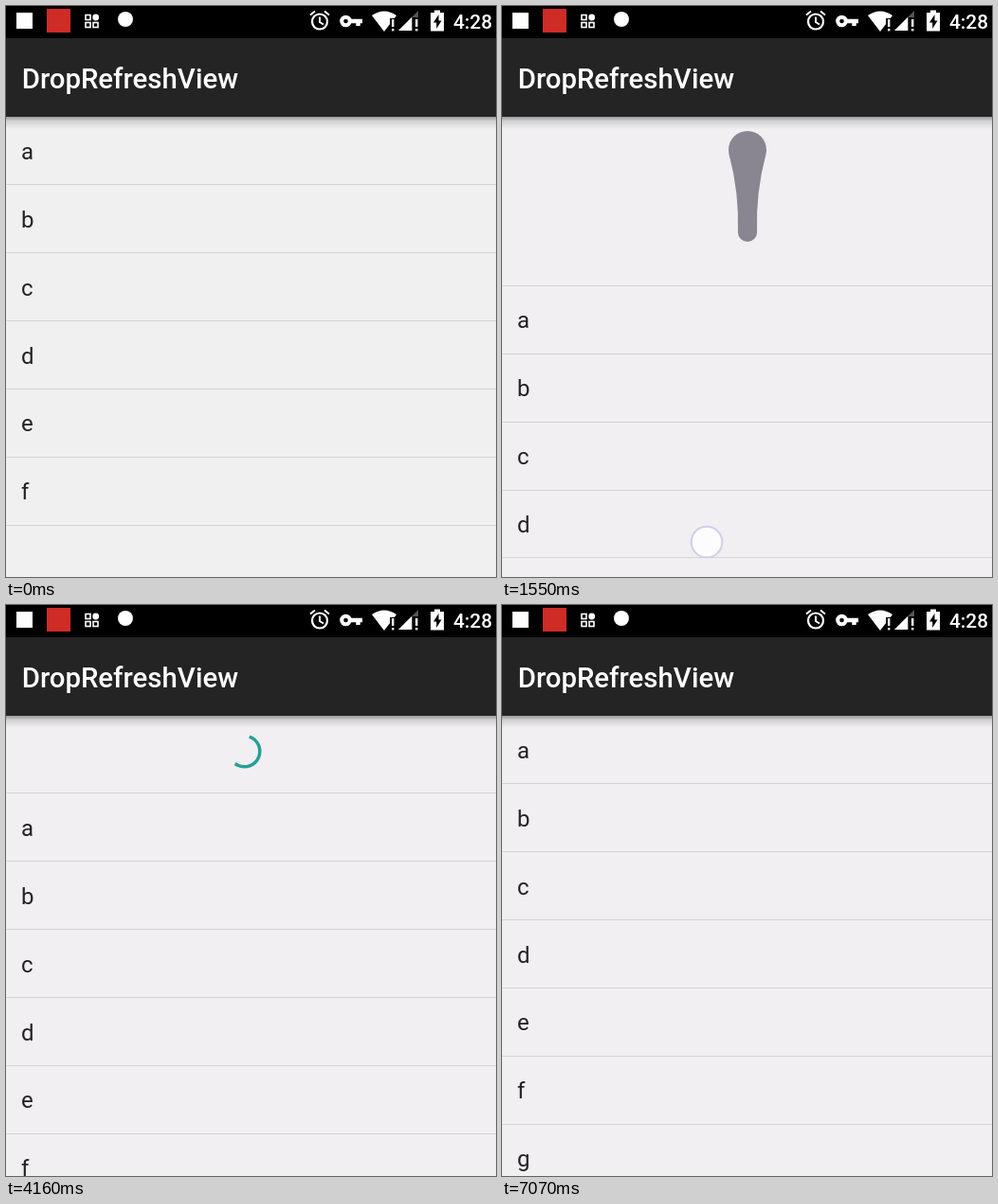
Write an HTML page with a canvas that moves like this. It is 517 by 603 pixels and loops after 7650 ms.

```html
<!DOCTYPE html>
<html lang="en">
<head>
<meta charset="utf-8">
<title>Pull to refresh</title>
<style>
  html, body { margin: 0; width: 100%; height: 100%; overflow: hidden; background: #f0f0f0; }
  canvas { display: block; width: 517px; height: 603px; }
</style>
</head>
<body>
<canvas id="stage" width="517" height="603"></canvas>
<script>
const ctx = document.getElementById('stage').getContext('2d');
const W = 517, H = 603, TAU = Math.PI * 2;
const LOOP = 7650, DRAG_START = 500, RELEASE = 2062, DONE = 6540, SETTLE = 525;
const LIST_TOP = 116.3, ROW = 71.9, HEADER = 82;

const clamp = (v, lo = 0, hi = 1) => Math.min(hi, Math.max(lo, v));
const smooth = u => (1 - Math.cos(Math.PI * clamp(u))) / 2;

// cubic-bezier(.4, 0, .2, 1)
function materialEase(x) {
  x = clamp(x);
  let lo = 0, hi = 1;
  for (let i = 0; i < 20; i++) {
    const s = (lo + hi) / 2, r = 1 - s;
    if (1.2 * s * r * r + 0.6 * s * s * r + s ** 3 < x) lo = s; else hi = s;
  }
  return lo * lo * (3 - 2 * lo);
}

function dragDistance(t) {
  const s = (clamp(t, DRAG_START, RELEASE) - DRAG_START) / 1000;
  return 204.8 * s - 33.2 * s * s;
}

function pullDistance(t) {
  if (t < RELEASE) return dragDistance(t);
  if (t < DONE) {
    const far = dragDistance(RELEASE);
    return far + (HEADER - far) * smooth((t - RELEASE) / SETTLE);
  }
  return HEADER * (1 - smooth((t - DONE) / SETTLE));
}

function rect(x, y, w, h, color) {
  ctx.fillStyle = color;
  ctx.fillRect(x, y, w, h);
}

function disc(x, y, r, color) {
  ctx.fillStyle = color;
  ctx.beginPath();
  ctx.arc(x, y, r, 0, TAU);
  ctx.fill();
}

function ring(x, y, r, width, color) {
  ctx.strokeStyle = color;
  ctx.lineWidth = width;
  ctx.beginPath();
  ctx.arc(x, y, r, 0, TAU);
  ctx.stroke();
}

function shape(path, color) {
  ctx.fillStyle = color;
  ctx.fill(new Path2D(path));
}

function line(path, width, color) {
  ctx.strokeStyle = color;
  ctx.lineWidth = width;
  ctx.stroke(new Path2D(path));
}

function text(str, x, y, size, weight, color) {
  ctx.font = `${weight} ${size}px Roboto, sans-serif`;
  ctx.fillStyle = color;
  ctx.fillText(str, x, y);
}

function drawDrop(pull) {
  const x = 259, y = 152, r = 20, color = '#898591';
  const stretch = Math.max(0, 0.9 * (pull - HEADER));
  const tipR = r - 1.065 * Math.sqrt(stretch), tipY = y + stretch;
  disc(x, y, r, color);
  disc(x, tipY, tipR, color);
  if (stretch < 6) return;
  const shoulder = r - 0.7, neck = tipR - 1.5, midY = (y + 5 + tipY) / 2;
  ctx.beginPath();
  ctx.moveTo(x - shoulder, y + 5);
  ctx.quadraticCurveTo(x - neck, midY, x - tipR, tipY);
  ctx.lineTo(x + tipR, tipY);
  ctx.quadraticCurveTo(x + neck, midY, x + shoulder, y + 5);
  ctx.fill();
}

function drawSpinner(elapsed) {
  const phase = elapsed / 1280 % 1;
  const base = phase / 4 + (elapsed * 0.1125 + 7) / 360 - 0.25;
  const from = base + 0.75 * materialEase(phase * 2 - 1);
  const to = Math.max(base + 0.75 * materialEase(phase * 2), from + 0.002);
  ctx.save();
  ctx.strokeStyle = '#269f97';
  ctx.lineWidth = 3.5;
  ctx.lineCap = 'square';
  ctx.beginPath();
  ctx.arc(251.5, 154.5, 16.3, from * TAU, to * TAU);
  ctx.stroke();
  ctx.restore();
}

function drawList(pull, items, background) {
  const top = LIST_TOP + pull;
  rect(0, Math.round(top), W, H, background);
  const divider = y => rect(0, Math.round(y), W, 1, '#d3d2d4');
  if (pull > 0) divider(top);
  [...items].forEach((item, i) => {
    text(item, 16, top + 45.5 + i * ROW, 24, 400, '#222');
    divider(top + (i + 1) * ROW);
  });
}

function drawStatusIcons() {
  const white = '#fff';
  rect(11, 7, 17, 17, white);
  rect(43, 3, 25, 25, '#cf2b27');

  ctx.strokeStyle = white;
  ctx.lineWidth = 1.6;
  for (const [x, y] of [[84, 9.5], [84, 17.5], [92, 17.5]]) ctx.strokeRect(x, y, 5, 5);
  disc(94.7, 12, 3.4, white);
  disc(126, 14, 8, white);

  // alarm
  ring(331, 16.5, 8, 2.2, white);
  line('M331 11.5V17L335 19.5M321 9.5L326 5.5M341 9.5L336 5.5', 2, white);

  // key
  ring(358.5, 16, 4.3, 4, white);
  line('M363 16H376M371.5 16V21', 4.4, white);

  // wifi with warning
  shape('M386 10Q399 1 412 10L399 27Z', white);
  rect(405, 13, 8, 15, '#000');
  rect(407, 14, 2.4, 8, white);
  rect(407, 24, 2.4, 2.4, white);

  // mobile signal with warning
  shape('M435 5V26H414Z', '#555');
  shape('M428 12V26H414Z', white);
  rect(429, 12, 7, 15, '#000');
  rect(432, 14, 2.4, 8, white);
  rect(432, 24, 2.4, 2.4, white);

  // charging battery
  shape('M448 7H452V4.5H458V7H462V26.5H448Z', white);
  shape('M456.5 9L451 17.5H454.2V24L459.5 15.5H456.5Z', '#000');
}

function drawBars() {
  const shadow = ctx.createLinearGradient(0, 117, 0, 130);
  shadow.addColorStop(0, 'rgba(0,0,0,.36)');
  shadow.addColorStop(0.35, 'rgba(0,0,0,.13)');
  shadow.addColorStop(1, 'rgba(0,0,0,0)');
  rect(0, 117, W, 13, shadow);
  rect(0, 0, W, 34, '#000');
  rect(0, 34, W, 83, '#242424');
  text('DropRefreshView', 16.7, 87, 29.4, 500, '#fff');
  drawStatusIcons();
  text('4:28', 472, 23.5, 20.8, 500, '#fff');
}

function drawTouch(t) {
  if (t <= DRAG_START + 10) return;
  const moved = dragDistance(t) - 117.5;
  ctx.globalAlpha = t < RELEASE ? 1 : clamp((2450 - t) / 410);
  const x = 203 + moved * 13 / 61, y = Math.min(513 + moved * 53 / 61, 613);
  disc(x, y, 16.5, 'rgba(255,255,255,.85)');
  ring(x, y, 16.3, 2, '#d0cee8');
  ctx.globalAlpha = 1;
}

function draw(t) {
  const pull = pullDistance(t);
  const background = t < DRAG_START ? '#f0f0f0' : '#f1eff2';
  rect(0, 0, W, H, background);
  if (t < RELEASE) drawDrop(pull);
  else drawSpinner(t - RELEASE);
  drawList(pull, t < DONE ? 'abcdef' : 'abcdefg', background);
  drawBars();
  drawTouch(t);
}

const start = performance.now();
function tick() {
  draw((performance.now() - start) % LOOP);
  requestAnimationFrame(tick);
}
tick();
</script>
</body>
</html>
```
